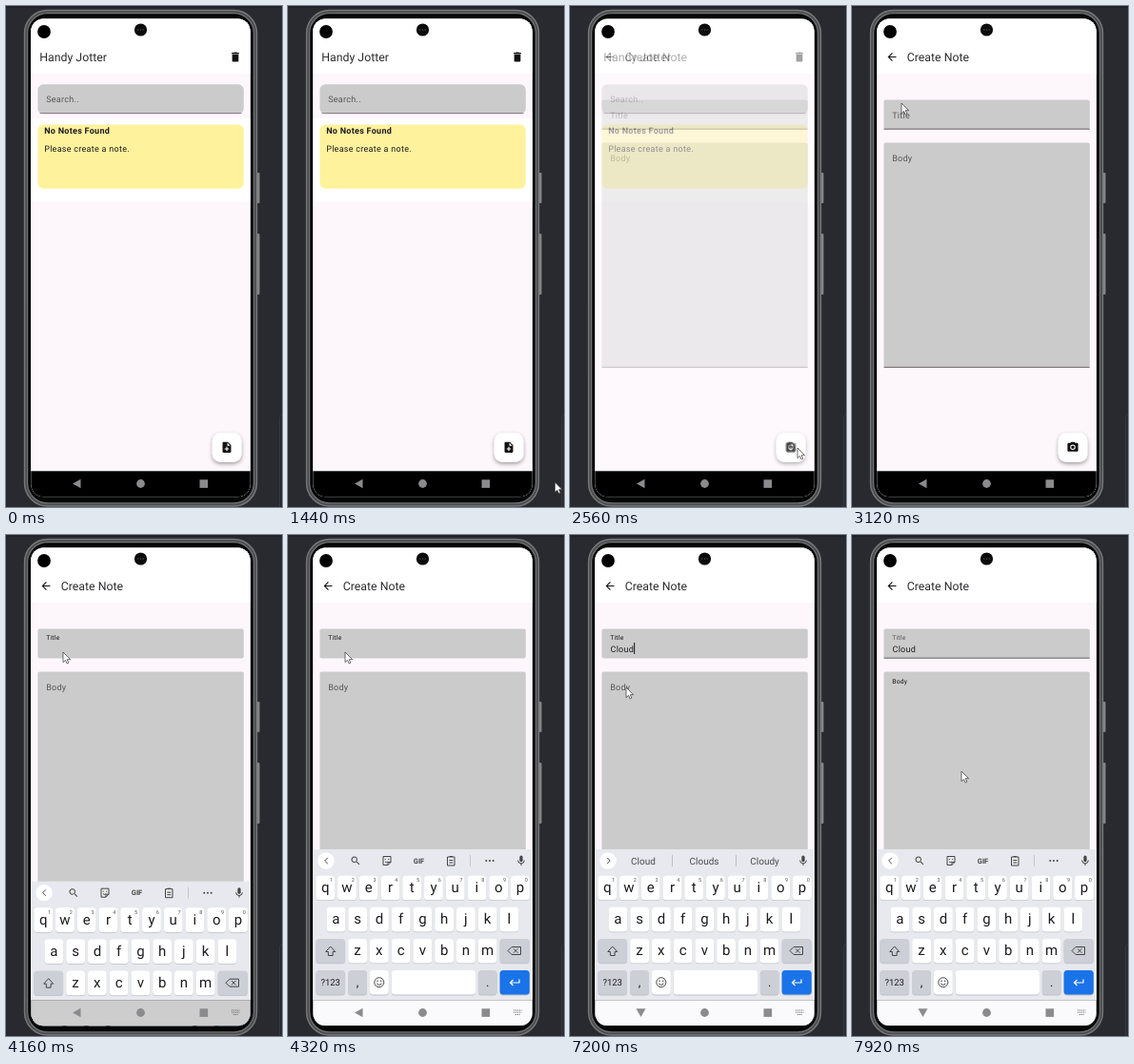
An HTML page that plays this animation: 290x526 px, repeating every 8 s.

```html
<!DOCTYPE html>
<html lang="en">
<head>
<meta charset="utf-8">
<title>Note app</title>
<style>
html, body { margin: 0; width: 100%; height: 100%; overflow: hidden; background: #292a2f; }
svg { display: block; width: 290px; height: 526px; }
text { font-family: Roboto, sans-serif; fill: #1d1b20; text-rendering: geometricPrecision; }
.head { font-size: 12.3px; fill: #2c2b2e; }
.body { font-size: 9px; letter-spacing: .28px; }
.hint { fill: #555; }
.bold { font-weight: 700; }
.key, .word, .gif { text-anchor: middle; }
.key { font-size: 15px; }
.word { font-size: 10px; fill: #484c50; }
.gif { font-size: 7.5px; font-weight: 700; fill: #444; }
.num { font-size: 5.5px; fill: #555; text-anchor: middle; }
.line { fill: none; stroke: #444; stroke-width: 1; }
</style>
</head>
<body>
<svg id="stage" viewBox="0 0 290 526"></svg>
<script>
const LOOP = 8000;
const WORD = 'Cloud';
const TYPED = [4800, 4960, 5200, 5520, 6240];
const SUGGESTED = [
  [4960, 'C', 'Can', 'Come'],
  [5120, 'Cl', 'Clear', 'Class'],
  [5360, 'Clo', 'Close', 'Cloth'],
  [5680, 'Clou', 'Clot', 'Loud'],
  [6480, 'Cloud', 'Clouds', 'Cloudy']
];
const TITLE_FOCUS = 4000, BODY_FOCUS = 7440;
const POINTER = [
  [1200, 292, 510], [2000, 239, 464], [2640, 239, 464], [3120, 52, 102],
  [3280, 52, 102], [3440, 60, 123], [6720, 60, 123], [6960, 67, 184],
  [7200, 59, 160], [7600, 59, 160], [7920, 115, 248]
];
const ICONS = {
  trash: 'M6 19c0 1.1.9 2 2 2h8c1.1 0 2-.9 2-2V7H6zM19 4h-3.5l-1-1h-5l-1 1H5v2h14z',
  add: 'M14 2H6c-1.1 0-2 .9-2 2v16c0 1.1.9 2 2 2h12c1.1 0 2-.9 2-2V8zm2 14h-3v3h-2v-3H8v-2h3v-3h2v3h3zm-3-7V3.5L18.5 9z',
  camera: 'M9 2L7.2 4H4c-1.1 0-2 .9-2 2v12c0 1.1.9 2 2 2h16c1.1 0 2-.9 2-2V6c0-1.1-.9-2-2-2h-3.2L15 2zM12 17a5 5 0 110-10 5 5 0 010 10zM12 8.8a3.2 3.2 0 100 6.4 3.2 3.2 0 000-6.4z',
  back: 'M20 11H7.8l5.6-5.6L12 4l-8 8 8 8 1.4-1.4L7.8 13H20z',
  search: 'M15.5 14h-.8l-.3-.3A6.5 6.5 0 109.5 16c1.6 0 3.1-.6 4.2-1.6l.3.3v.8l5 5 1.5-1.5zm-6 0a4.5 4.5 0 110-9 4.5 4.5 0 010 9z',
  mic: 'M12 14c1.7 0 3-1.3 3-3V5a3 3 0 00-6 0v6c0 1.7 1.3 3 3 3zm5.3-3c0 3-2.5 5.1-5.3 5.1S6.7 14 6.7 11H5c0 3.4 2.7 6.2 6 6.7V21h2v-3.3c3.3-.5 6-3.3 6-6.7z'
};

const rect = (x, y, w, h, fill, r = 0, more = '') =>
  `<rect x="${x}" y="${y}" width="${w}" height="${h}" rx="${r}" fill="${fill}" ${more}/>`;
const circle = (x, y, r, fill, more = '') => `<circle cx="${x}" cy="${y}" r="${r}" fill="${fill}" ${more}/>`;
const text = (x, y, cls, str, id = '') => `<text x="${x}" y="${y}" class="${cls}" id="${id}">${str}</text>`;
const icon = (name, x, y, size = 13.4, fill = '#111') =>
  `<path d="${ICONS[name]}" fill="${fill}" fill-rule="evenodd" transform="translate(${x - size / 2} ${y - size / 2}) scale(${size / 24})"/>`;
const line = (d, more = '') => `<path class="line" d="${d}" ${more}/>`;
const box = (y, h, fill, r) => rect(33.4, y, 216.4, h, fill, r);
const underline = (y, id = '') => rect(33.4, y, 216.4, .9, '#5d5159', 0, `id="${id}"`);
const fab = name => rect(216.8, 448.2, 30.6, 30.6, '#fff', 8.5, 'filter="url(#shadow)"') + icon(name, 232, 463.3);
const page = rect(26, 13, 231, 502, '#fdf7fc') + rect(26, 13, 231, 58, '#fff');

const home = page + text(35.3, 58.2, 'head', 'Handy Jotter') + icon('trash', 241, 53.5) +
  box(82.2, 31, '#cbcbcb', 6) + rect(35.5, 112.2, 212, .9, '#7d737a') +
  text(42.2, 100.8, 'body hint', 'Search..') +
  rect(26, 118, 231, 87.5, '#fff') + box(124.4, 67.4, '#fff29c', 6) +
  text(40.2, 133.8, 'body bold', 'No Notes Found') + text(40.2, 152.8, 'body', 'Please create a note.') + fab('add');

const create = page + icon('back', 42, 53.5) + text(57.8, 58.2, 'head', 'Create Note') +
  box(98.4, 31, '#cbcbcb', 2) + underline(128.7, 'underline') +
  box(143.6, 236, '#cbcbcb', 2) + underline(378.8) +
  text(42.2, 118, 'body hint', 'Title', 'titleLabel') + text(42.2, 163, 'body hint', 'Body', 'bodyLabel') +
  text(42.5, 122.5, 'body', '', 'typed') + rect(0, 113, 1, 12, '#111', 0, 'id="caret"') + fab('camera');

function key(x, y, w, label = '', fill = '#fff', size = 15) {
  return rect(x, y + .8, w, 25.6, '#bec1c7', 3.5) + rect(x, y, w, 25.6, fill, 3.5) +
    `<text x="${x + w / 2}" y="${y + 12.6 + size * .33}" class="key" style="font-size:${size}px">${label}</text>`;
}
const row = (letters, x, y) => [...letters].map((c, i) => key(x + i * 22.75, y, 19.8, c)).join('');

function keyboard() {
  const grey = '#ccd0d6';
  const digits = [...'1234567890'].map((d, i) => text(45.5 + i * 22.75, 364, 'num', d)).join('');
  const tools = icon('search', 71, 342, 12, '#444') +
    line('M100 337.5h8v6l-3 3h-5zM108 343.5h-3v3M102 343q1.5 1.6 3 0M102.3 340v1M105.7 340v1') +
    text(137.5, 344.7, 'gif', 'GIF') +
    line('M167.5 338h7.5v9h-7.5zM169.5 337.5h3.5M169.3 341.5h4M169.3 344h4') +
    line('M191.5 336v12', 'opacity=".2"') + [208.3, 212, 215.7].map(x => circle(x, 342, 1, '#444')).join('') +
    line('M41.8 338.8l-3.2 3.2 3.2 3.2');
  const words = [77, 141, 204.5].map((x, i) => text(x, 345.6, 'word', '', 'word' + i)).join('') +
    line('M107.5 336v12M174.5 336v12', 'opacity=".25"') + line('M39 338.8l3.2 3.2-3.2 3.2');
  return rect(26, 330, 231, 159, '#e7e9ee') + circle(40, 342, 8.7, '#fff') +
    `<g id="tools">${tools}</g><g id="words">${words}</g>` + icon('mic', 245, 342, 13, '#444') +
    row('qwertyuiop', 29.3, 357.7) + digits + row('asdfghjkl', 40.5, 390.8) + row('zxcvbnm', 63.2, 423.9) +
    key(29.3, 423.9, 30.8, '', grey) + line('M44.7 432l5 5.5h-2.6v4h-4.8v-4h-2.6z') +
    key(222.6, 423.9, 31.2, '', grey) + line('M235 432.5h9.5v8H235l-4-4zM237 434.3l4.4 4.4M241.4 434.3l-4.4 4.4') +
    key(29.3, 457, 30.8, '?123', grey, 9.5) + key(63.2, 457, 19.8, ',', grey, 13) + key(86, 457, 19.8) +
    circle(95.8, 469.7, 5, 'none', 'class="line"') + circle(94, 468.3, .8, '#444') + circle(97.6, 468.3, .8, '#444') +
    line('M93.2 471q2.6 3 5.2 0') + key(108.7, 457, 88.3) + key(199.8, 457, 19.8, '.', grey, 13) +
    key(222.6, 457, 31.2, '', '#1a73e8') + line('M243 466.5v3.5h-9.5M236.5 467l-3 3 3 3', 'style="stroke:#fff;stroke-width:1.2"');
}

const nav = rect(26, 488.3, 231, 27, '#000') + rect(26, 488.3, 231, 27, '#fafafc', 0, 'id="navLight"') +
  `<g fill="#8b8b8d"><path id="navBack"/><circle cx="141.5" cy="501.5" r="4.4"/><rect x="203.5" y="497.3" width="8.6" height="8.6"/></g>` +
  `<g id="navKeys">${line('M237 499h8.5M237 501.2h8.5M238.8 503.5h5', 'stroke-dasharray="1.3 .7" opacity=".7"')}</g>`;

const phone = rect(0, 0, 290, 526, '#292a2f') + rect(0, 0, 290, 2, '#222328') +
  rect(287.5, 429.5, 20, 120, 'none', 3, 'stroke="#37383d"') +
  rect(263.5, 175, 3, 32, '#85868a', 1) + rect(263.5, 239, 3, 64, '#85868a', 1) +
  rect(19.5, 4.5, 244, 520.5, '#4b4c4e', 24, 'stroke="#77787a" stroke-width="1.4"') +
  rect(22.6, 7.6, 237.8, 514.3, '#060607', 21, 'stroke="#707173" stroke-width="1.2"');

const $ = id => document.getElementById(id);
$('stage').innerHTML = `<defs>
  <clipPath id="screen">${rect(26.3, 13.4, 230.4, 501.8, '#fff', 13)}</clipPath>
  <filter id="shadow" x="-30%" y="-30%" width="160%" height="160%">
    <feDropShadow dx="0" dy="2" stdDeviation="2" flood-opacity=".38"/></filter></defs>` + phone +
  `<g clip-path="url(#screen)">${rect(26, 13, 231, 502, '#fff')}
    <g id="home">${home}</g><g id="create">${create}</g><g id="keyboard">${keyboard()}</g>${nav}</g>` +
  circle(40, 27, 6.9, '#000') + circle(141.5, 25, 6.6, '#0b0b0c') +
  [138.8, 141.5, 144.2].map(x => circle(x, 25, .7, '#555')).join('') +
  `<path id="pointer" d="M0 0V10.6L2.5 8.4 4.1 12 5.8 11.2 4.2 7.7H7.6Z" fill="#fff" stroke="#333" stroke-width=".7"/>`;

const show = (id, on) => { $(id).style.display = on ? '' : 'none'; };
const progress = (t, start, length) => Math.min(1, Math.max(0, (t - start) / length));

// Material standard easing, cubic-bezier(.4, 0, .2, 1)
function ease(x) {
  let lo = 0, hi = 1, s = .5;
  for (let i = 0; i < 16; i++) {
    s = (lo + hi) / 2;
    const at = 1.2 * (1 - s) ** 2 * s + .6 * (1 - s) * s * s + s ** 3;
    if (at < x) lo = s; else hi = s;
  }
  return 3 * (1 - s) * s * s + s ** 3;
}

function floatLabel(id, p, from, to, focused) {
  const label = $(id);
  label.setAttribute('y', from + (to - from) * p);
  label.style.fontSize = 9 - 2.3 * p + 'px';
  label.style.fill = focused ? '#111' : '#555';
}

function movePointer(t) {
  show('pointer', t >= POINTER[0][0]);
  const i = Math.max(0, POINTER.findLastIndex(p => p[0] <= t));
  const a = POINTER[i], b = POINTER[i + 1] || a;
  const p = a === b ? 0 : progress(t, a[0], b[0] - a[0]);
  const e = p * p * (3 - 2 * p);
  $('pointer').setAttribute('transform', `translate(${a[1] + (b[1] - a[1]) * e} ${a[2] + (b[2] - a[2]) * e})`);
}

function draw(t) {
  const fade = ease(progress(t, 2350, 700));
  $('home').setAttribute('opacity', 1 - fade);
  $('create').setAttribute('opacity', fade);

  const inTitle = t >= TITLE_FOCUS && t < BODY_FOCUS;
  floatLabel('titleLabel', ease(progress(t, TITLE_FOCUS, 150)), 118, 110, inTitle);
  floatLabel('bodyLabel', ease(progress(t, BODY_FOCUS, 150)), 163, 155.5, t >= BODY_FOCUS);
  show('underline', !inTitle);

  const count = TYPED.filter(at => at <= t).length;
  const typed = $('typed');
  typed.textContent = WORD.slice(0, count);
  show('caret', count && inTitle && (t - TYPED[count - 1]) % 960 < 480);
  $('caret').setAttribute('x', count ? 42.5 + typed.getComputedTextLength() : 42.5);

  const slide = ease(progress(t, TITLE_FOCUS, 300));
  $('keyboard').setAttribute('transform', `translate(0 ${185 * (1 - slide)})`);
  show('keyboard', slide > 0);
  $('navLight').setAttribute('opacity', slide);
  show('navKeys', slide > .5);
  $('navBack').setAttribute('d', t < 4400 ? 'M70 501.5l8.5-4.8v9.6z' : 'M74.5 506l-5-8.7h10z');

  const words = inTitle && SUGGESTED.findLast(s => s[0] <= t);
  show('tools', !words);
  show('words', words);
  if (words) words.slice(1).forEach((w, i) => { $('word' + i).textContent = w; });

  movePointer(t);
}

const start = performance.now();
function tick() {
  draw((performance.now() - start) % LOOP);
  requestAnimationFrame(tick);
}
tick();
</script>
</body>
</html>
```
